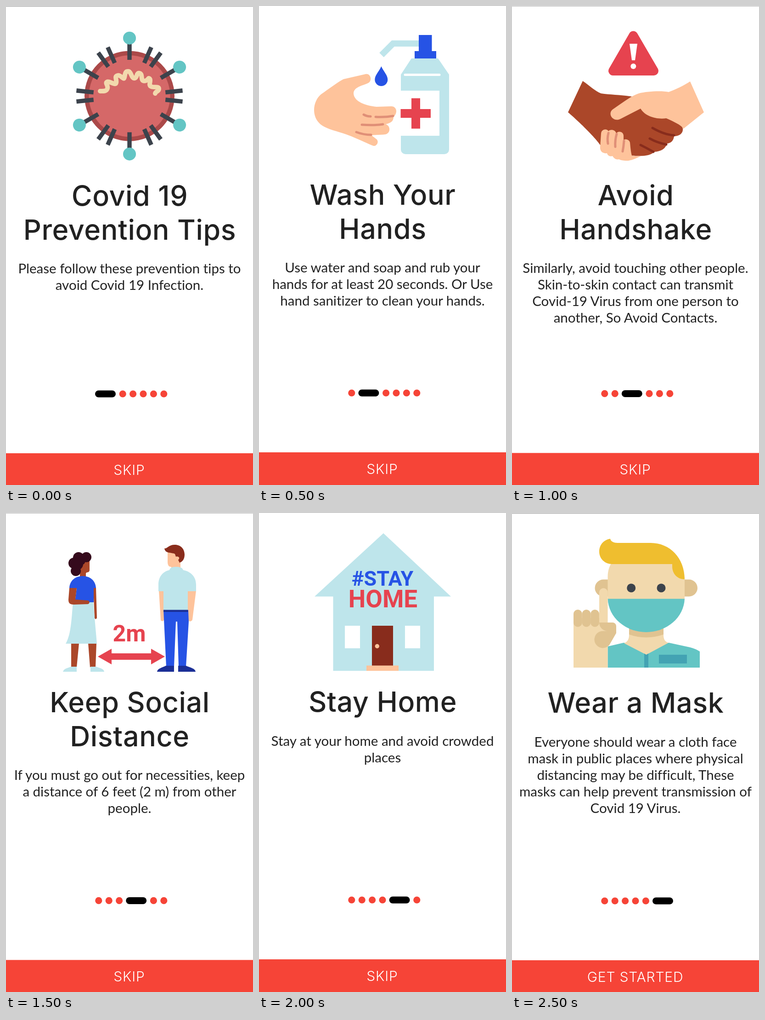
Recreate the animation shown at these times as an HTML page. Size 538 px wide and 1041 px high, loop 3 s.

```html
<!DOCTYPE html>
<html lang="en">
<head>
<meta charset="utf-8">
<title>Prevention tips</title>
<style>
  html, body { margin: 0; width: 100%; height: 100%; overflow: hidden; background: #fff; }
  svg { display: block; width: 100%; height: 100%; }
  text { text-anchor: middle; fill: #212121; }
  .title { font: 500 61px Inter, sans-serif; letter-spacing: .6px; }
  .body { font: 29.5px Lato, sans-serif; font-variant-ligatures: none; }
  .button { font: 300 30px Inter, sans-serif; letter-spacing: .8px; fill: #fff; }
  .sign { font-family: Roboto, sans-serif; font-weight: 700; }
  .line { fill: none; stroke-linecap: round; stroke-width: 5; }
</style>
</head>
<body>
<svg id="stage" viewBox="0 0 538 1041"></svg>
<script>
const RED = '#f64437', SIGNAL = '#e6434f', BLUE = '#2653e5', NAVY = '#1b2f96', PALE = '#bee5eb',
  PEACH = '#fec39b', FOLD = '#e08f77', BROWN = '#ab4729', MAROON = '#882c1c', PLUM = '#350a1c',
  SKIN = '#f2d9ad', SHADE = '#e0c391', TEAL = '#63c5c4', SLATE = '#3c434c', STEEL = '#43a3b3';

const path = (fill, d) => `<path fill="${fill}" d="${d}"/>`;
const line = (stroke, d) => `<path class="line" stroke="${stroke}" d="${d}"/>`;
const rect = (fill, x, y, w, h, r = 0) =>
  `<rect fill="${fill}" x="${x}" y="${y}" width="${w}" height="${h}" rx="${r}"/>`;
const circle = (fill, x, y, r) => `<circle fill="${fill}" cx="${x}" cy="${y}" r="${r}"/>`;
const text = (cls, x, y, s, extra = '') => `<text class="${cls}" x="${x}" y="${y}" ${extra}>${s}</text>`;
const sign = (fill, x, y, size, s) => text('sign', x, y, s, `style="fill:${fill};font-size:${size}px"`);

function virus() {
  const turn = (a, s) => `<g transform="rotate(${a} 269 195.7)">${s}</g>`;
  const bar = rect(SLATE, 264.3, 79.5, 9.4, 37.5);
  let s = circle('#ab4949', 269, 195.7, 98) + circle('#d56868', 269, 195.7, 88.5);
  for (let a = 0; a < 360; a += 60)
    s += turn(a, bar + circle(TEAL, 269, 69.7, 14)) + turn(a + 24.1, bar) + turn(a + 35.9, bar);
  return s + `<path class="line" stroke="${SKIN}" style="stroke-width:10" d="M205 185C212 185 219 186 221 179
    S215 168 220 165S238 174 240 167S235 153 243 151S256 163 258 155S259 142 266 142S273 158 280 157
    S283 144 291 146S292 163 301 163S309 154 313 158S309 172 316 175S333 174 333 180S326 185 325 190"/>`;
}

const washing = () =>
  `<path fill="none" stroke="${PALE}" stroke-width="13.5" d="M350 81.5H292L267 106.5"/>` +
  rect(BLUE, 348, 63, 28.5, 36) + rect(BLUE, 339, 98, 47, 17) +
  path(PALE, 'M332 114H390L414 149V312a10 10 0 0 1-10 10H319a10 10 0 0 1-10-10V149Z') +
  line('#fff', 'M318 149.5H393') + rect('#fff', 308, 184, 85, 98) +
  rect(SIGNAL, 332, 200.5, 19, 66) + rect(SIGNAL, 308.5, 224, 65.5, 19) +
  path(BLUE, 'M266.3 131C271 142 280.3 150 280.3 160a14 14 0 0 1-28 0C252.3 150 262 142 266.3 131Z') +
  path(PEACH, `M184 159L232 148C242 146 247 159 240 166C233 172 205 174 206 191C208 208 232 217 257 219
    L288 218C300 218 303 232 293 241C293 250 288 254 276 257C287 260 287 277 275 279C268 280 256 280 245 281
    L254 288C262 292 259 304 250 304C245 303 210 286 190 279C170 272 150 268 138 260
    C113 244 116 208 135 192C150 182 170 166 184 159Z`) +
  line(FOLD, 'M228 236Q235 240 243 240M254 241Q275 242 292 239M224 258Q250 260 270 257M212 274Q228 280 244 280');

const handshake = () =>
  `<path fill="${SIGNAL}" stroke="${SIGNAL}" stroke-width="20" stroke-linejoin="round" d="M264.3 64.5L220 141H309Z"/>` +
  path('#fff', 'M256 82H273L268 118H261Z') + circle('#fff', 264.3, 131, 6) +
  path(BROWN, `M154 163C168 172 182 186 194 190C215 193 240 193 262 197L335 243C350 250 372 258 372 267
    C373 277 364 283 353 283C352 293 346 298 337 299C335 310 325 316 310 317C300 326 285 327 259 325
    L192 302C180 284 140 246 122 231Z`) +
  path(PEACH, `M388 164L418 231L373 267C371 260 352 251 336 244C315 247 290 240 280 223L237 245
    C221 254 207 235 219 225C240 211 260 195 276 190C295 185 328 184 341 187C357 181 374 173 388 164Z`) +
  path(PEACH, `M192 306L194 277C195 267 207 266 210 272C214 267 226 269 227 277C231 270 243 273 243 282V291
    C248 288 256 291 257 297C258 308 259 318 261 325Q271 327 281 326C270 331 257 338 245 336
    C239 335 236 335 233 333C227 335 222 331 219 326C212 328 208 324 207 320C199 321 191 317 192 306Z`) +
  line(FOLD, 'M210 276Q207 288 209 299M228 278Q224 292 225 306M244 293Q243 306 241 316') +
  line(MAROON, 'M306 265C320 273 335 280 353 281M300 288Q316 297 336 301M280 302Q294 309 308 317');

const distance = () =>
  // woman
  path(BROWN, 'M160 104H182V124Q182 129 176 129L174 131V139H161Z') +
  [[158, 97, 12], [175, 96, 11], [148, 109, 12], [152, 126, 11], [155, 111, 13], [164, 104, 9]]
    .map(c => circle(PLUM, ...c)).join('') +
  path(BROWN, 'M142 283H159L154 335H142ZM179 283H197L195 335H183ZM190 162H196L198 228Q195 233 193 228Z') +
  path(PALE, `M146 194H190L198 284H130C143 262 143 220 146 194Z
    M124 345C126 338 134 337 142 334H154V345ZM184 345V334H196C204 337 213 338 214 345Z`) +
  path(BLUE, 'M138 163C139 146 152 137 167 137C182 137 195 146 196 163H191V194H150L154 163Z') +
  path(BROWN, 'M138 163H154L151 188L178 190C183 191 183 197 178 198L148 199C138 199 136 195 136 188Z') +
  sign(SIGNAL, 268.5, 279, 50, '2m') +
  path(SIGNAL, 'M200 312L230 295V305H316V295L346 312L316 329V319H230V329Z') +
  // man
  path(PEACH, `M352 84H380V120H360V117Q352 117 352 107Z
    M333 169H344V233Q340 237 337 233ZM396 169H414L406 232C404 237 397 236 396 232Z`) +
  path('#8a2d1c', `M345 77C351 78 353 70 366 69C380 68 389 78 389 90C389 101 384 106 378 108L375 102
    C380 98 376 93 370 95L368 89C360 85 347 89 345 77Z`) +
  path(PALE, `M356 124C358 118 362 117 371 117C380 117 384 119 386 124C402 127 414 138 414 156V170H396V211
    H343V170H332V156C332 138 342 127 356 124Z`) +
  path(BLUE, 'M343 211H397L398 236L392 334H376L373 236H370L366 334H349Z') + rect(NAVY, 343, 210.5, 53.5, 4.5) +
  path(NAVY, 'M329 345C330 338 340 336 348 332H366V345ZM375 345V332H392C402 336 412 338 413 345Z');

const house = () =>
  path(PALE, 'M271 44L418 181.5H381V343H161.5V181.5H121Z') +
  sign(BLUE, 269, 158, 45, '#STAY') + sign(SIGNAL, 270, 204.5, 53, 'HOME') +
  rect('#fff', 187, 245, 33, 49) + rect('#fff', 318, 245, 33, 49) +
  rect(MAROON, 246, 245, 46, 87) + circle(PEACH, 257.3, 289.5, 4.7) + rect(PEACH, 234, 331.5, 70, 11.5);

const mask = () =>
  path(SHADE, 'M209 144.5H199a18.5 18.5 0 0 0 0 37h10ZM375 144.5H385.5a18.5 18.5 0 0 1 0 37H375Z') +
  path(TEAL, 'M208.5 336V290L243 282H342L388 292Q400 295 409 301V336Z') +
  path(SKIN, 'M255 240H330V265C330 274 333 280 341 282L292.5 308L244 283C252 280 255 274 255 265Z') +
  path(SHADE, 'M255 245H330V264Q292 277 255 264Z') +
  path(STEEL, 'M288 305.5L292.5 308L297 305.5V336H288Z') + rect(STEEL, 320, 308, 61, 19) +
  path(SKIN, 'M208.5 188V138C208.5 126 212 116 217 108H350L376 140V188Z') +
  path(TEAL, 'M208.5 186.5H376A83.8 75 0 0 1 208.5 186.5Z') +
  path('#efbe2f', `M214 56C215 62 222 65 230 65H302C344 65 376 98 376 144C360 144 349 132 349 116V111H218
    C202 111 190 99 190 84C190 68 201 58 214 56Z`) +
  circle(SLATE, 259.7, 163, 9.5) + circle(SLATE, 325, 163, 9.5) +
  path(SKIN, 'M134 228H190V172.5a9.25 9.25 0 0 1 18.5 0V336H134Z') +
  [134, 152.6, 171.2].map(x => rect(SHADE, x, 210, 18.7, 37.5, 9.3)).join('') +
  path(SHADE, `M190 238H219a8 8 0 0 1 8 8V261L212 287A18.5 18.5 0 1 1 199 256.5H208
    C198 256.5 190 248 190 238Z`);

// shift: small vertical offset of the page around the picture
const slides = [
  { art: virus, shift: 0, title: ['Covid 19', 'Prevention Tips'],
    body: ['Please follow these prevention tips to', 'avoid Covid 19 Infection.'] },
  { art: washing, shift: -2, title: ['Wash Your', 'Hands'],
    body: ['Use water and soap and rub your', 'hands for at least 20 seconds. Or Use', 'hand sanitizer to clean your hands.'] },
  { art: handshake, shift: -.6, title: ['Avoid', 'Handshake'],
    body: ['Similarly, avoid touching other people.', 'Skin-to-skin contact can transmit',
      'Covid-19 Virus from one person to', 'another, So Avoid Contacts.'] },
  { art: distance, shift: -.6, title: ['Keep Social', 'Distance'],
    body: ['If you must go out for necessities, keep', 'a distance of 6 feet (2 m) from other', 'people.'] },
  { art: house, shift: -2, title: ['Stay Home'],
    body: ['Stay at your home and avoid crowded', 'places'] },
  { art: mask, shift: 0, title: ['Wear a Mask'],
    body: ['Everyone should wear a cloth face', 'mask in public places where physical',
      'distancing may be difficult, These', 'masks can help prevent transmission of', 'Covid 19 Virus.'] },
];

const dots = active => slides.map((_, k) => k === active
  ? rect('#000', 194 + 22.4 * k, 835.5, 45, 15, 7.5)
  : circle(RED, 201.8 + 22.4 * k + (k > active ? 30 : 0), 843, 7.6)).join('');

function page({ art, shift, title, body }, i) {
  const top = 435 + 73 * title.length;
  return art() + `<g transform="translate(0 ${shift})">` + rect('#bababa', 0, 0, 538, 1.6) +
    title.map((s, n) => text('title', 269.5, 434 + 73.5 * n, s)).join('') +
    body.map((s, n) => text('body', 269, top + 36 * n, s)).join('') +
    dots(i) + rect(RED, 0, 972, 538, 80) +
    text('button', 268.5, 1019, i < slides.length - 1 ? 'SKIP' : 'GET STARTED') + '</g>';
}

const stage = document.getElementById('stage');
const pages = slides.map(page);
const start = performance.now();
let shown = -1;

function draw() {
  const i = Math.floor((performance.now() - start) / 500) % pages.length;
  if (i !== shown) stage.innerHTML = pages[shown = i];
  requestAnimationFrame(draw);
}
draw();
</script>
</body>
</html>
```
